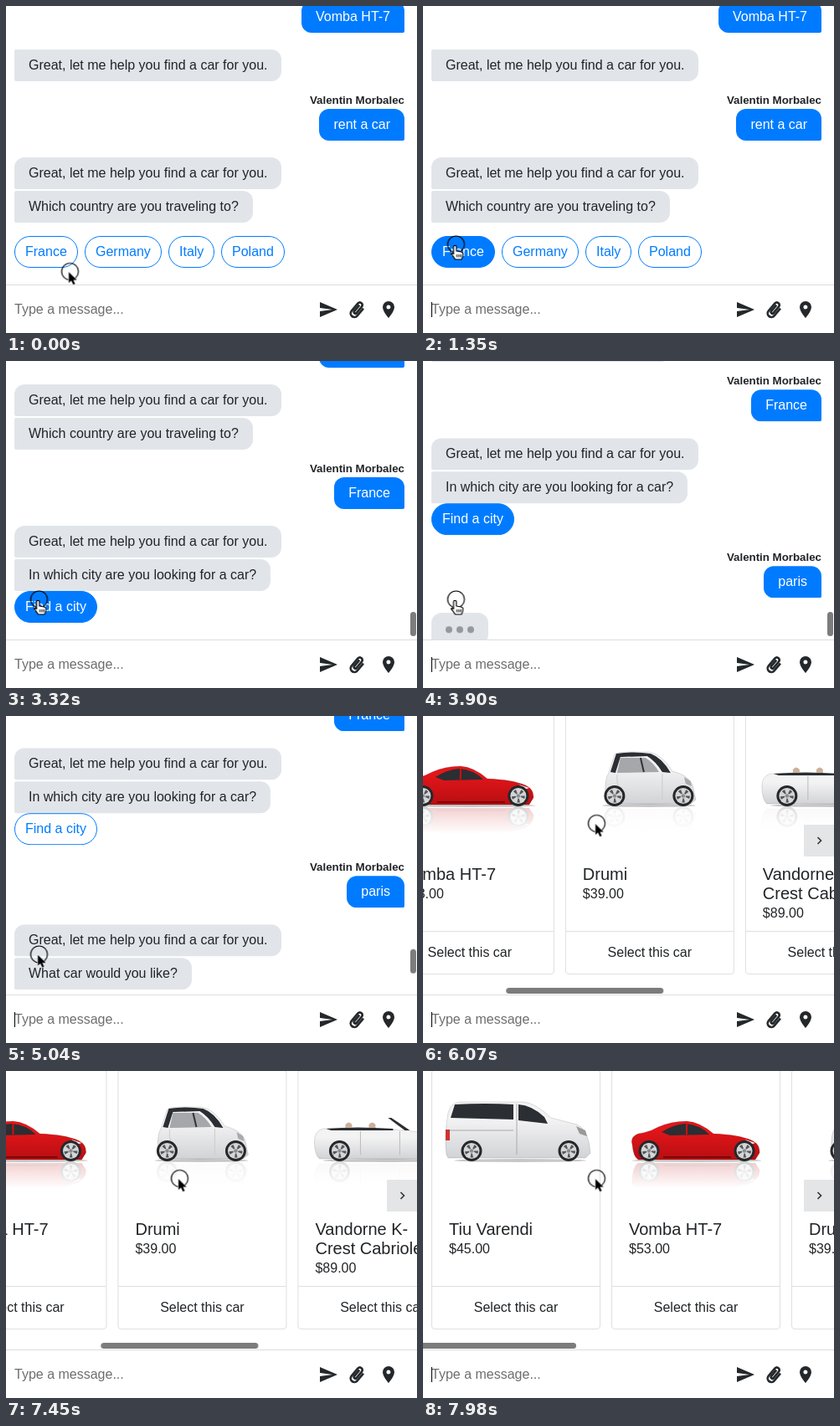
Write an HTML page that moves like this. It is 491 px wide and 391 px high and loops after 8 s.

```html
<!DOCTYPE html>
<html lang="en">
<head>
<meta charset="utf-8">
<title>Car rental chat</title>
<style>
html, body { margin: 0; width: 100%; height: 100%; overflow: hidden; background: #fff; }
body { position: relative; font: 16px "Liberation Sans", Arial, sans-serif; color: #212427; white-space: nowrap; }
#view { position: absolute; left: 0; top: 0; width: 491px; height: 333px; overflow: hidden; }
#log { position: absolute; left: 0; top: 0; width: 491px; animation: scroll 8s cubic-bezier(.37, 0, .63, 1) infinite; }
#log > *, .group > * { position: absolute; }
.group { left: 0; top: 0; width: 491px; }

.msg { left: 10px; height: 38px; line-height: 38px; padding: 0 17px; background: #e1e5ea; border-radius: 2px 12px 12px 2px; }
.first { border-radius: 12px 12px 12px 2px; }
.mine { left: auto; right: 15px; background: #007bff; color: #fff; border-radius: 12px 12px 2px 12px; }
.name { right: 15px; font-size: 13.3px; font-weight: bold; line-height: 16px; }
.chip { height: 36px; line-height: 36px; padding: 0 12px; border: 1px solid #007bff; border-radius: 19px; color: #007bff; background: #fff; }

.typing { width: 34px; }
.typing i { position: absolute; top: 16px; width: 8px; height: 8px; border-radius: 50%; background: #24282b; animation: dot 1.142857s infinite; animation-delay: calc(var(--d) + var(--i) * .2s); }
.typing i:nth-child(1) { --i: 0; left: 17px; }
.typing i:nth-child(2) { --i: 1; left: 30px; }
.typing i:nth-child(3) { --i: 2; left: 43px; }
@keyframes dot { 0%, 44%, to { opacity: .4 } 22% { opacity: 1 } }

/* what is on screen, and when */
.step { animation: 8s step-end infinite; }
#choices { animation-name: choices; }
#reply1 { animation-name: reply1; }
#typing1 { animation-name: typing1; --d: -.077s; }
#ask { animation-name: ask; }
#reply2 { animation-name: reply2; }
#typing2 { animation-name: typing2; --d: -.422s; }
#offer { animation-name: offer; }
@keyframes choices { 0% { visibility: visible } 19.75%, to { visibility: hidden } }
@keyframes reply1 { 0% { visibility: hidden } 19.75%, to { visibility: visible } }
@keyframes typing1 { 0%, 32.25% { visibility: hidden } 21.25% { visibility: visible } to { visibility: hidden } }
@keyframes ask { 0% { visibility: hidden } 32.25%, to { visibility: visible } }
@keyframes reply2 { 0% { visibility: hidden } 45%, to { visibility: visible } }
@keyframes typing2 { 0%, 61.85% { visibility: hidden } 46.375% { visibility: visible } to { visibility: hidden } }
@keyframes offer { 0% { visibility: hidden } 61.85%, to { visibility: visible } }

@keyframes scroll {
  0%, 19.75% { transform: translateY(0) }
  24.75%, 32.25% { transform: translateY(-69px) }
  37.5%, 45% { transform: translateY(-153px) }
  50.2%, 61.85% { transform: translateY(-280px) }
  68%, to { transform: translateY(-657px) }
}

#france { animation: france 8s infinite; }
#city { animation: city 8s infinite; }
@keyframes france {
  0%, 9.3% { background: #fff; color: #007bff }
  10.3%, to { background: #007bff; color: #fff }
}
@keyframes city {
  0%, 37.3% { background: #fff; color: #007bff }
  38.3%, 51.6% { background: #007bff; color: #fff }
  53.2%, to { background: #fff; color: #007bff }
}

/* card deck */
#deck { left: 0; top: 655px; width: 491px; height: 332px; overflow: hidden; }
#cards { position: absolute; left: 10px; top: 0; animation: slide 8s cubic-bezier(.33, 1, .68, 1) infinite; }
.card { position: absolute; top: 0; width: 200px; height: 309px; border: 1px solid #dfdfdf; border-radius: 4px; background: #fff; }
.card svg { position: absolute; left: -1px; top: 1px; }
.info { position: absolute; left: 20px; top: 179px; width: 150px; line-height: 23px; white-space: normal; }
.info b { display: block; font-weight: normal; font-size: 20px; }
.pick { position: absolute; bottom: 0; width: 100%; height: 50px; line-height: 50px; text-align: center; border-top: 1px solid #dfdfdf; }
#next { position: absolute; right: 0; top: 132px; width: 36px; height: 38px; background: #e4e5e6; }
@keyframes slide {
  0%, 74.375% { transform: translateX(0) }
  81.7%, 81.75% { transform: translateX(-540px) }
  88.875%, 90.75% { transform: translateX(-795px) }
  99.5%, to { transform: translateX(0) }
}

.bar { position: absolute; background: #7c7c7c; border-radius: 4px; }
#hbar { left: -5px; top: 325px; width: 188px; height: 7px; animation: hmove 8s cubic-bezier(.33, 1, .68, 1) infinite, hshow 8s step-end infinite; }
@keyframes hmove {
  0%, 74.375% { transform: translateX(0) }
  81.7%, 81.75% { transform: translateX(208.4px) }
  88.875%, 90.75% { transform: translateX(306.9px) }
  99.5%, to { transform: translateX(0) }
}
@keyframes hshow { 0% { opacity: 0 } 74.375%, to { opacity: 1 } }
#vbar { left: 483px; top: 0; width: 7px; height: 29px; animation: vmove 8s cubic-bezier(.37, 0, .63, 1) infinite, vfade 8s linear infinite; }
@keyframes vmove {
  0%, 19.75% { transform: translateY(298px) }
  24.75%, 32.25% { transform: translateY(301px) }
  37.5%, 61.84% { transform: translateY(300px) }
  61.85% { transform: translateY(277px) }
  68%, to { transform: translateY(298px) }
}
@keyframes vfade {
  0%, 20% { opacity: 0 }
  20.7%, 56.25% { opacity: 1 }
  60%, 61.8% { opacity: 0 }
  61.9%, 71.6% { opacity: 1 }
  73.75%, to { opacity: 0 }
}

/* message box */
#box { position: absolute; left: 0; top: 333px; width: 491px; height: 57px; border-top: 1px solid #dcdcdc; background: #fff; }
#box span { position: absolute; left: 10px; top: 19px; line-height: 20px; color: #6e6e6e; }
#box svg { position: absolute; left: 370px; top: 15px; fill: #24282b; }
#caret { position: absolute; left: 10px; top: 20px; width: 1px; height: 18px; background: #000; animation-name: caret; }
@keyframes caret {
  0%, 10.625%, 19.75%, 52.875%, 65.375%, 77.875%, 90.375% { opacity: 0 }
  4.375%, 16.875%, 46.625%, 59.125%, 71.625%, 84.125%, 96.625%, to { opacity: 1 }
}

/* pointer */
#pointer { position: absolute; left: 0; top: 0; overflow: visible; animation: move 8s ease-in-out infinite; }
#arrow { animation-name: arrow; }
#hand { animation-name: hand; }
@keyframes move {
  0%, 8.125% { transform: translate(76.5px, 317.5px) }
  12.5% { transform: translate(54px, 271.5px) }
  16.75%, 71.25% { transform: translate(39.5px, 285px) }
  74.25%, to { transform: translate(207.5px, 128.5px) }
}
@keyframes arrow { 0%, 19.75%, 51.6% { opacity: 1 } 9.375%, 37.5% { opacity: 0 } to { opacity: 1 } }
@keyframes hand { 0%, 19.75%, 51.6% { opacity: 0 } 9.375%, 37.5% { opacity: 1 } to { opacity: 0 } }
</style>
</head>
<body>
<div id="view">
  <div id="log">
    <div class="msg mine" style="top:-6px">Vomba HT-7</div>
    <div class="msg" style="top:52px">Great, let me help you find a car for you.</div>
    <div class="name" style="top:105px">Valentin Morbalec</div>
    <div class="msg mine" style="top:123px">rent a car</div>
    <div class="msg first" style="top:181px">Great, let me help you find a car for you.</div>
    <div class="msg" style="top:221px">Which country are you traveling to?</div>

    <div id="choices" class="group step">
      <div id="france" class="chip" style="left:10px;top:275px">France</div>
      <div class="chip" style="left:94px;top:275px">Germany</div>
      <div class="chip" style="left:194px;top:275px">Italy</div>
      <div class="chip" style="left:257px;top:275px">Poland</div>
    </div>
    <div id="reply1" class="group step">
      <div class="name" style="top:274px">Valentin Morbalec</div>
      <div class="msg mine" style="top:292px">France</div>
    </div>
    <div id="typing1" class="msg first typing step" style="top:348px"><i></i><i></i><i></i></div>

    <div id="ask" class="group step">
      <div class="msg first" style="top:350px">Great, let me help you find a car for you.</div>
      <div class="msg" style="top:390px">In which city are you looking for a car?</div>
      <div id="city" class="chip" style="left:10px;top:428px">Find a city</div>
    </div>
    <div id="reply2" class="group step">
      <div class="name" style="top:485px">Valentin Morbalec</div>
      <div class="msg mine" style="top:503px">paris</div>
    </div>
    <div id="typing2" class="msg first typing step" style="top:559px"><i></i><i></i><i></i></div>

    <div id="offer" class="group step">
      <div class="msg first" style="top:561px">Great, let me help you find a car for you.</div>
      <div class="msg" style="top:601px">What car would you like?</div>
      <div id="deck">
        <div id="cards"></div>
        <svg id="next" viewBox="0 0 36 38"><path d="M16.500 15l4 4-4 4" fill="none" stroke="#333" stroke-width="1.600"/></svg>
      </div>
    </div>
  </div>
  <div id="hbar" class="bar"></div>
  <div id="vbar" class="bar"></div>
</div>

<div id="box">
  <span>Type a message...</span>
  <div id="caret" class="step"></div>
  <svg width="110" height="30">
    <path transform="translate(3 2)" d="M2 21l21-9L2 3v7l15 2-15 2z"/>
    <path transform="translate(49.500 14.500) rotate(40) scale(.94) translate(-12.500 -12)" stroke="#24282b" stroke-width="1.300" d="M16.500 6v11.500a4 4 0 01-8 0V5a2.500 2.500 0 015 0v10.500a1 1 0 01-2 0V6H10v9.500a2.500 2.500 0 005 0V5a4 4 0 00-8 0v12.500a5.500 5.500 0 0011 0V6z"/>
    <path transform="translate(75 2)" fill-rule="evenodd" d="M12 2a7 7 0 00-7 7c0 5.200 7 13 7 13s7-7.800 7-13a7 7 0 00-7-7zm0 9.500a2.500 2.500 0 110-5 2.500 2.500 0 010 5z"/>
  </svg>
</div>

<svg id="pointer" width="1" height="1">
  <circle r="10" fill="none" stroke="#000" stroke-width="1.200"/>
  <path id="arrow" class="step" transform="translate(-1.500 .5) scale(.88)" d="M0 0V15L3.500 11.800 6 17.300 8.600 16.200 6.200 10.800H11Z" stroke="#fff" stroke-width="1.200" paint-order="stroke"/>
  <g id="hand" class="step" fill="#fff" stroke="#000" stroke-width="1.200" stroke-linejoin="round">
    <path d="M-3 3A1.700 1.700 0 01.4 3V8L6 9Q8.500 9.500 8.300 12Q8.200 15 6.500 18H-1Q-3 14.500-5.500 12Q-6.500 9.500-3 11.500Z"/>
    <path d="M1 12v3.500M3.300 12v3.500M5.600 12v3.500" fill="none" stroke-width="1"/>
  </g>
</svg>

<svg width="0" height="0" style="position:absolute">
  <defs>
    <linearGradient id="white" x2="0" y2="1"><stop offset=".3" stop-color="#f3f3f4"/><stop offset="1" stop-color="#d2d3d6"/></linearGradient>
    <linearGradient id="silver" x2="0" y2="1"><stop offset=".2" stop-color="#e2e2e2"/><stop offset="1" stop-color="#a3a5a7"/></linearGradient>
    <linearGradient id="red" x2="0" y2="1"><stop offset=".2" stop-color="#e3161a"/><stop offset="1" stop-color="#b80e12"/></linearGradient>
    <linearGradient id="fade" x2="0" y2="1"><stop offset="0" stop-color="#fff" stop-opacity="0"/><stop offset="1" stop-color="#fff"/></linearGradient>
    <g id="wheel">
      <circle r="12.500" fill="#26272a"/><circle r="9.500" fill="#d4d5d7"/>
      <circle r="5.500" fill="none" stroke="#55575a" stroke-width="5" stroke-dasharray="2.500 4.410"/>
      <circle r="2.200" fill="#8a8c8f"/>
    </g>
  </defs>
</svg>

<script>
const cars = [
  { name: "Tiu Varendi", price: 45, paint: "white", wheels: [48, 164], mirror: 0,
    body: "M18 100Q15 78 20 50Q23 38 34 37H110Q124 38 143 56L174 64Q188 70 190 98L184 104H20Z",
    glass: "M23 56L28 40Q65 38 98 40V58ZM104 40Q120 41 135 55L139 63L104 59Z",
    extra: '<path d="M17 70h5v13h-5z" fill="#c33"/><path d="M102 39V100M22 71H98" stroke="#aaa" fill="none"/><path d="M173 66l11 5 2 7-9-3z" fill="#999"/>' },
  { name: "Vomba HT-7", price: 53, paint: "red", wheels: [45, 159], mirror: .2,
    body: "M25 88Q22 79 32 75Q46 73 56 67Q72 60 90 60Q106 61 122 75Q152 76 168 83Q178 88 177 98L172 106H32Q26 102 25 88Z",
    glass: "M60 73Q74 64 88 63Q106 64 117 76L70 77Z",
    extra: '<path d="M90 63V76" stroke="#c11" stroke-width="2"/><path d="M62 103H143" stroke="#7d0508" stroke-width="2"/><path d="M160 82l12 4-6 2z" fill="#eee"/>' },
  { name: "Drumi", price: 39, paint: "white", wheels: [59, 141], mirror: .08,
    body: "M48 92Q47 76 52 68L59 46Q62 43 78 43H100Q116 46 128 66Q146 70 152 82L156 100L150 105H50Z",
    glass: "M54 67L61 45Q82 42 102 45Q116 50 126 68L116 67Q108 54 98 48L66 49L60 68Z",
    extra: '<path d="M66 50H96Q106 56 112 67L62 68Z" fill="#a5a7aa"/><path d="M90 50l4 17" stroke="#333" stroke-width="2"/><path d="M62 70Q60 88 74 100M116 69V100" stroke="#ccc" fill="none"/><path d="M142 73l8 5 1 6-7-3z" fill="#aaa"/>' },
  { name: "Vandorne K-Crest Cabriolet", price: 89, paint: "white", wheels: [50, 160], mirror: .15,
    body: "M20 84Q20 72 30 69Q64 67 114 70Q156 72 174 82Q183 90 183 100L176 105H26Q20 100 20 84Z",
    glass: "M34 69Q70 66 114 69V71H40ZM108 56L112 56L134 71H128Z",
    extra: '<path d="M57 68v-4q4-5 8 0v4zM85 68v-4q4-5 8 0v4z" fill="#cbb09a"/><path d="M75 72V100M122 72V100" stroke="#bbb"/><path d="M165 80l10 4 2 5-9-3z" fill="#999"/>' },
  { name: "Tolm EB", price: 44, paint: "white", wheels: [51, 149], mirror: .03,
    body: "M35 86Q34 70 42 62Q50 52 66 51H92Q108 52 124 67Q158 69 168 78Q174 86 173 100L166 105H40Z",
    glass: "M48 65Q56 55 66 54H80V66ZM84 54H92Q106 56 118 67H84Z",
    extra: '<path d="M35 69l9-2-1 8-8 2z" fill="#e2572b"/><path d="M82 54V100M118 69V98" stroke="#bbb"/><path d="M158 76l10 3 1 5-8-2z" fill="#aaa"/>' },
  { name: "NWQ 4 Series", price: 76, paint: "silver", wheels: [50, 153], mirror: .15,
    body: "M19 88Q18 72 27 64Q36 53 58 52H104Q122 54 138 68Q168 71 178 80Q182 90 181 100L174 105H26Z",
    glass: "M32 67Q42 57 58 55H72V68ZM75 55H102Q118 57 131 69L75 68Z",
    extra: '<path d="M19 74l8-2v6l-8 1z" fill="#b55"/><path d="M74 54V99M102 56V99" stroke="#999"/><path d="M166 77l10 4 1 5-8-3z" fill="#eee"/>' }
];

const picture = (c, i) => `<svg width="200" height="150">
  <ellipse cx="${(c.wheels[0] + c.wheels[1]) / 2}" cy="107" rx="${(c.wheels[1] - c.wheels[0]) * .68}" ry="2" fill="#000" opacity=".22"/>
  <use href="#car${i}" transform="translate(0 216) scale(1 -1)" opacity="${c.mirror}"/>
  <rect x="2" y="109" width="196" height="32" fill="url(#fade)"/><rect x="2" y="140" width="196" height="10" fill="#fff"/>
  <g id="car${i}">
    <path d="${c.body}" fill="url(#${c.paint})" stroke="#000" stroke-opacity=".18" stroke-width=".7"/>
    <path d="${c.glass}" fill="#2b2e32"/>${c.extra}
    ${c.wheels.map(x => `<use href="#wheel" x="${x}" y="95.500"/>`).join("")}
  </g></svg>`;

document.getElementById("cards").innerHTML = cars.map((c, i) =>
  `<div class="card" style="left:${i * 215}px">${picture(c, i)}
    <div class="info"><b>${c.name}</b>$${c.price}.00</div>
    <div class="pick">Select this car</div></div>`).join("");
</script>
</body>
</html>
```
